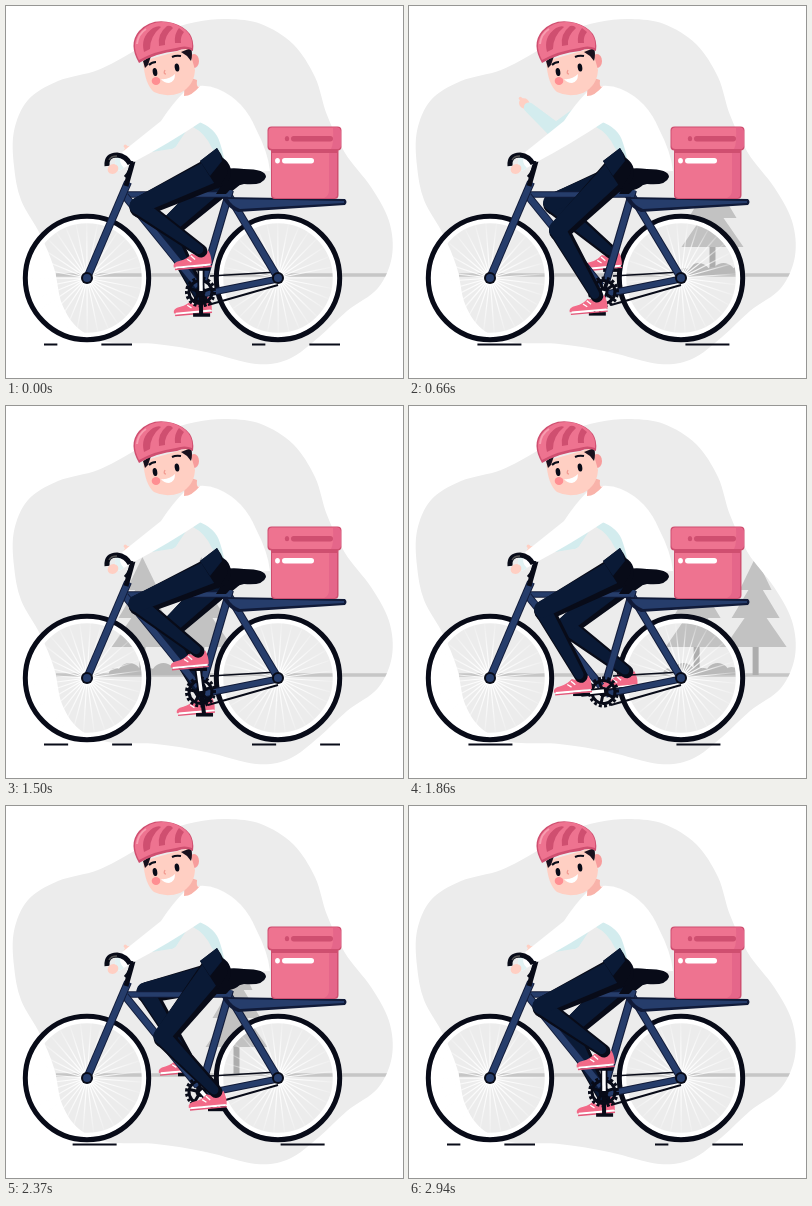
Write an HTML page with a canvas that moves like this. It is 397 px wide and 372 px high and loops after 2970 ms.

```html
<!DOCTYPE html>
<html>
<head>
<meta charset="utf-8">
<title>Courier on a bicycle</title>
<style>
html, body { margin: 0; width: 100%; height: 100%; overflow: hidden; background: #fff; }
canvas { display: block; }
</style>
</head>
<body>
<canvas id="stage" width="397" height="372"></canvas>
<script>
const c = document.getElementById('stage').getContext('2d');
const LOOP = 2970, CYCLE = 2940, TAU = Math.PI * 2;
const NAVY = '#263d6b', INK = '#080b18', PINK = '#ee7390', ROSE = '#cf4f70',
  SKIN = '#ffcfc3', ICE = '#d3ecee', GREY = '#ececec', CLOTH = '#0a1a36';

const fill = (d, color) => { c.fillStyle = color; c.fill(new Path2D(d)); };
const stroke = (d, color, width) => {
  c.strokeStyle = color;
  c.lineWidth = width;
  c.stroke(new Path2D(d));
};
const oval = (x, y, rx, ry, color, turn = 0) => {
  c.fillStyle = color;
  c.beginPath();
  c.ellipse(x, y, rx, ry, turn, 0, TAU);
  c.fill();
};
const ring = (x, y, r, color, width) => {
  c.strokeStyle = color;
  c.lineWidth = width;
  c.beginPath();
  c.arc(x, y, r, 0, TAU);
  c.stroke();
};
const box = (x, y, w, h, r, color) => {
  c.fillStyle = color;
  c.beginPath();
  c.roundRect(x, y, w, h, r);
  c.fill();
};
const ease = u => { u = Math.min(1, Math.max(0, u)); return u * u * (3 - 2 * u); };

// closed Catmull-Rom curve
function smooth(p) {
  const n = p.length, at = i => p[(i + n) % n], path = new Path2D();
  path.moveTo(...p[0]);
  for (let i = 0; i < n; i++) {
    const [a, b, d, e] = [at(i - 1), at(i), at(i + 1), at(i + 2)];
    path.bezierCurveTo(b[0] + (d[0] - a[0]) / 6, b[1] + (d[1] - a[1]) / 6,
      d[0] - (e[0] - b[0]) / 6, d[1] - (e[1] - b[1]) / 6, d[0], d[1]);
  }
  return path;
}
const blob = smooth([[222, 13], [255, 18], [287, 38], [309, 71], [321, 109], [339, 147],
  [365, 181], [383, 215], [386, 250], [372, 282], [341, 305], [313, 331], [283, 353],
  [250, 358], [200, 346], [150, 338], [102, 336], [73, 323], [56, 298], [48, 262],
  [34, 228], [15, 194], [8, 160], [8, 125], [22, 94], [52, 75], [92, 64],
  [128, 45], [158, 26], [190, 16]]);

// tapered limb with round ends
function limb(a, b, ra, rb, color) {
  const t = Math.atan2(b[1] - a[1], b[0] - a[0]);
  c.fillStyle = color;
  c.beginPath();
  c.arc(a[0], a[1], ra, t + Math.PI / 2, t - Math.PI / 2);
  c.arc(b[0], b[1], rb, t - Math.PI / 2, t + Math.PI / 2);
  c.fill();
}

function tree(x) {
  fill(`M${x - 3} 236H${x + 3}V269H${x - 3}Z`, '#adadad');
  for (const [top, base, half] of [[196, 241, 31], [172, 212, 24], [151, 184, 16]])
    fill(`M${x} ${top}L${x + half} ${base}H${x - half}Z`, '#c2c2c2');
}

function bush(x) {
  for (const [dx, r] of [[-14, 7], [0, 12], [14, 8]]) {
    c.fillStyle = '#b9b9b9';
    c.beginPath();
    c.arc(x + dx, 269, r, Math.PI, TAU);
    c.fill();
  }
}

function scenery(t) {
  c.fillStyle = GREY;
  c.fill(blob);
  c.save();
  c.clip(blob);
  stroke('M50 269H384', '#c6c6c6', 3.5);
  // lone trees pass faster than the pair
  const lone = 0.5 * t, pair = 0.42 * t;
  tree(lone - 27); bush(lone - 41); bush(lone - 16);
  tree(pair - 494); tree(pair - 435); bush(pair - 507); bush(pair - 473);
  tree(lone - 955);
  c.restore();
}

function dashes(x, t) {
  c.save();
  c.beginPath();
  c.rect(x, 334, 88, 8);
  c.clip();
  const s = (57 + t * 12 * 88 / CYCLE) % 88;
  for (const start of [x + s, x + s - 88])
    stroke(`M${start} 338.5h44`, INK, 2);
  c.restore();
}

function wheel(x, turn) {
  const y = 272;
  const glow = c.createRadialGradient(x, y, 5, x, y, 55);
  glow.addColorStop(0, '#fff');
  glow.addColorStop(0.5, 'rgba(255,255,255,.7)');
  glow.addColorStop(1, 'rgba(255,255,255,.15)');
  c.strokeStyle = glow;
  c.lineWidth = 1.2;
  c.beginPath();
  for (let i = 0; i < 32; i++) {
    const a = turn + i * TAU / 32;
    c.moveTo(x, y);
    c.lineTo(x + 55 * Math.cos(a), y + 55 * Math.sin(a));
  }
  c.stroke();
  ring(x, y, 57, '#fff', 4.5);
  ring(x, y, 61.7, INK, 5);
}

function hub(x) {
  oval(x, 272, 6, 6, INK);
  oval(x, 272, 4, 4, NAVY);
}

const pedalAt = a => [195 - 23 * Math.sin(a), 285 - 23 * Math.cos(a)];

function pedal(p) {
  stroke(`M${p[0] - 8} ${p[1] + 1}h17`, INK, 3.5);
}

function shoe([x, y]) {
  c.save();
  c.translate(x, y);
  c.rotate(-0.09);
  fill('M-5-20L6-20 9-12-4-11Z', SKIN);
  fill('M-8-15Q0-11 9-17Q12-10 11-3L-27-3Q-28-8-20-9Q-13-10-8-15Z', '#f26a88');
  stroke('M-13-10l4 3M-9-13l4 4', '#fff', 1.3);
  stroke('M-25-2.5H10', '#fff', 2);
  stroke('M-26-.8H11', '#e45578', 1.4);
  c.restore();
}

function leg(hip, p) {
  const thigh = 83, shin = 75, foot = [p[0], p[1] - 17];
  const dx = foot[0] - hip[0], dy = foot[1] - hip[1], d = Math.hypot(dx, dy);
  const bend = Math.acos((thigh * thigh + d * d - shin * shin) / (2 * thigh * d));
  const a = Math.atan2(dy, dx) + bend;
  const knee = [hip[0] + thigh * Math.cos(a), hip[1] + thigh * Math.sin(a)];
  const lit = ([x, y]) => [x - 2, y - 1.5];
  shoe(p);
  limb(knee, foot, 10, 6.5, INK);
  limb(hip, knee, 16, 10.5, INK);
  limb(lit(knee), lit(foot), 8, 4.5, CLOTH);
  limb(lit(hip), lit(knee), 12, 8.5, CLOTH);
}

function tube(d, width) {
  stroke(d, '#101a38', width);
  stroke(d, NAVY, width - 2);
}

function frame() {
  stroke('M204 270L272 266', INK, 1.6);
  tube('M197 288L272 273', 7);
  stroke('M202 299L272 279', INK, 2);
  tube('M223 190L272 272', 8);
  tube('M224 184L197 276', 8);
  tube('M119 188.5H222', 6.5);
  tube('M119 190L192 280', 8);
  tube('M122 176L81 272', 8);
  stroke('M127 155L120 180', INK, 5);
  fill('M216 191L339 193Q342 196 339 199L232 206Q222 203 216 191Z', '#101a38');
  fill('M222 193L338 195V197L234 203Q226 200 222 193Z', NAVY);
  hub(81);
  hub(272);
}

function gear(a) {
  c.save();
  c.translate(194.5, 286);
  c.rotate(-a);
  c.setLineDash([3, 2.2]);
  ring(0, 0, 14, INK, 3);
  c.setLineDash([]);
  ring(0, 0, 11.5, INK, 3);
  for (let i = 0; i < 5; i++) {
    c.rotate(TAU / 5);
    stroke('M0 0V-11', INK, 3);
  }
  c.restore();
  oval(194.5, 286, 5, 5, INK);
}

function cargo() {
  box(265, 138, 67.5, 55, 4, ROSE);
  box(266, 139, 65, 53, 4, PINK);
  fill('M323 144H331V188Q331 192 327 192H318Q323 190 323 184Z', '#e5668a');
  fill('M266 143H331V147H266Z', ROSE);
  box(261.5, 120.5, 74, 24, 4, ROSE);
  box(262.5, 121.5, 72, 21.5, 4, PINK);
  fill('M327 122H331Q335 122 335 127V139Q335 143 331 143H325Q328 138 327 122Z', '#e5668a');
  box(285, 130, 42, 5.5, 3, ROSE);
  oval(281, 132.7, 2.2, 2.6, ROSE);
  box(276, 152, 32, 5.5, 3, '#fff');
  oval(271.5, 154.8, 2.4, 2.7, '#fff');
}

function farArm(lift) {
  const elbow = [164 - 17 * lift, 135 - 10 * lift];
  const a = (166 + 55 * lift) * Math.PI / 180;
  const reach = r => [elbow[0] + r * Math.cos(a), elbow[1] + r * Math.sin(a)];
  const [x, y] = reach(42);
  limb([181, 104], elbow, 11, 8, ICE);
  oval(x, y, 5.5, 5, SKIN, a);
  limb([x + 1, y], [x - 4, y - 5], 2, 1.6, SKIN);
  limb(elbow, reach(36), 8, 5, ICE);
}

function body() {
  fill('M180 84Q195 76 212 83Q238 94 250 123Q262 146 264 165L222 167Q216 150 196 118L172 104Z', '#fff');
  fill('M191 115Q210 122 214 137Q219 152 220 166Q213 150 206 142Q199 127 187 121Z', ICE);
  // near arm
  fill('M178 86Q166 98 155 115L110 151Q107 158 113 165L126 157Q162 138 198 114Q206 100 194 86Z', '#fff');
  fill('M110 151Q107 158 113 165L118 162Q112 157 115 148Z', '#e2f2f3');
  fill('M213 168Q217 160 238 163Q260 163 260 171Q257 180 238 178Q226 180 220 188H210Q218 178 213 168Z', INK);
}

function grip() {
  stroke('M101 160Q100 149 111 149Q120 150 124 158', INK, 5);
  stroke('M103 154Q105 150 111 150', '#555', 1.4);
  oval(107, 163, 5.5, 4.8, SKIN, -0.5);
  stroke('M126 155Q125 165 119 171', INK, 3);
}

function helmet() {
  c.save();
  c.translate(1, -3);
  fill('M132 60Q121 41 132 28Q145 14 166 20Q189 27 186 48Q179 44 170 48Q149 50 132 60Z', ROSE);
  fill('M132 57Q123 40 134 28Q146 16 165 20Q187 27 185 45Q178 42 169 45Q148 48 132 57Z', PINK);
  fill('M137 49Q133 34 146 25Q152 22 154 24Q143 33 143 46Z', ROSE);
  fill('M152 43Q150 31 160 23Q164 22 166 25Q157 33 158 42Z', ROSE);
  fill('M168 40Q167 31 172 25L177 29Q173 34 174 40Z', ROSE);
  stroke('M130 41Q131 31 139 26', '#f79db0', 2);
  c.restore();
}

function head() {
  fill('M179 70L191 74Q190 83 194 80Q186 90 178 90Z', '#f9b3aa');
  oval(188, 55, 5, 7, '#f79c9c');
  fill('M137 55Q139 79 148 86Q160 92 174 87Q188 80 189 64L183 42Z', SKIN);
  fill('M175 46L185 42Q187 48 185 55L181 50Z', '#18101d');
  fill('M137 55L145 50 142 59 139 62Z', '#18101d');
  oval(149, 66, 2.3, 4, INK, -0.15);
  oval(171, 61.5, 2.3, 4, INK, -0.15);
  stroke('M143 59Q146 56 150 56M166 51Q170 49 175 50', INK, 2);
  stroke('M159 64Q157 68 160 68', '#f29b92', 1.3);
  oval(150, 75, 4.3, 4, '#ff8e92');
  fill('M155 73Q163 74 169 68Q169 76 163 77Q158 77 155 73Z', '#fff');
  helmet();
}

function draw(t) {
  const a = t / CYCLE * 2 * TAU;
  const near = pedalAt(a), far = pedalAt(a + Math.PI);
  const lift = ease((t - 240) / 330) * (1 - ease((t - 1110) / 300));
  c.lineCap = 'butt';
  c.lineJoin = 'round';
  c.clearRect(0, 0, 397, 372);
  scenery(t);
  dashes(38, t);
  dashes(246, t);
  wheel(81, -a);
  wheel(272, -a);
  leg([222, 168], far);
  stroke(`M195 285L${far}`, INK, 4);
  pedal(far);
  frame();
  cargo();
  gear(a);
  stroke(`M195 285L${near}`, INK, 7);
  stroke(`M195 285L${near}`, '#fff', 3.5);
  pedal(near);
  farArm(lift);
  body();
  leg([209, 166], near);
  fill('M194 155L211 142Q219 153 222 167L212 183Z', INK);
  fill('M194 155L211 142Q215 148 216 155L204 170Z', CLOTH);
  grip();
  head();
}

const begin = performance.now();
function tick() {
  draw((performance.now() - begin) % LOOP);
  requestAnimationFrame(tick);
}
tick();
</script>
</body>
</html>
```
